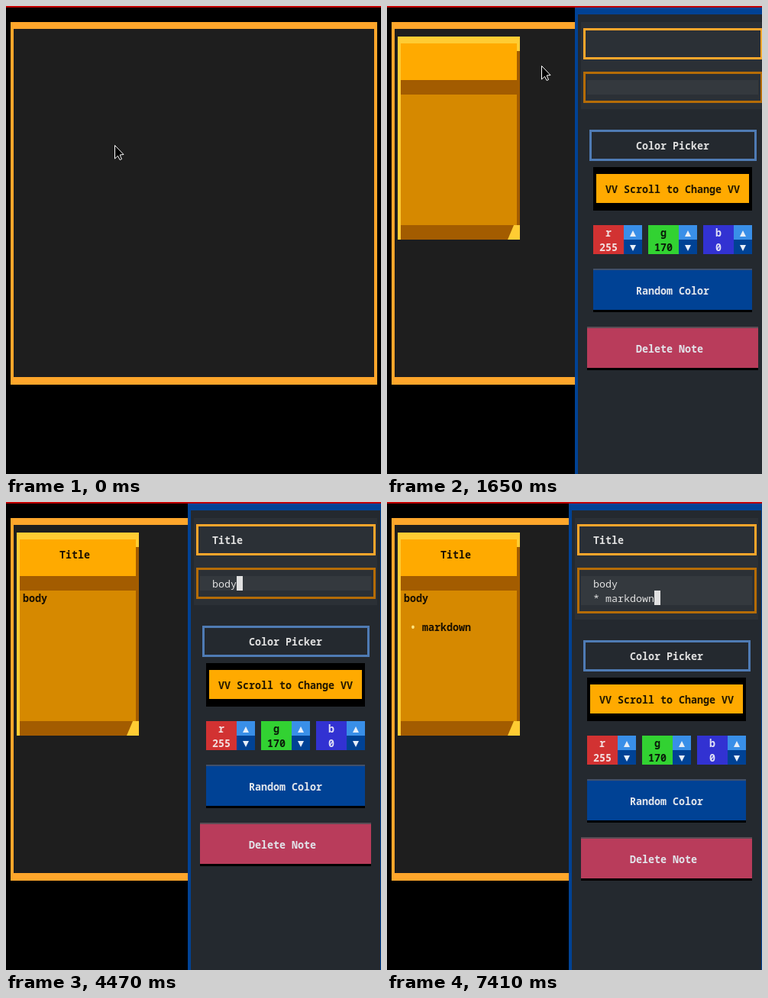
Write an HTML page with a canvas that moves like this. It is 491 by 613 pixels and loops after 8 s.

```html
<!DOCTYPE html>
<html lang="en">
<head>
<meta charset="utf-8">
<title>Sticky notes</title>
<style>
html, body { margin: 0; width: 100%; height: 100%; overflow: hidden; background: #000; }
canvas { display: block; }
</style>
</head>
<body>
<canvas id="stage" width="491" height="613"></canvas>
<script>
const ctx = document.getElementById('stage').getContext('2d');
const LOOP = 8000, CELL = 8, ROW = 19;
const FONT = '13.333px "Noto Sans Mono", "DejaVu Sans Mono", monospace';
const BLUE = '#004295', AMBER = '#ffaa00', BROWN = '#a35c00', YELLOW = '#ffcc33';
const LIGHT = '#e0e0e0', PANEL = '#24292f', SECTION = '#2b3036';

// Key presses as [time, characters typed so far]
const titleKeys = [[2520, 1], [2580, 2], [2820, 3], [2910, 4], [3000, 5]];
const bodyKeys = [[3990, 1], [4140, 2], [4380, 3], [4470, 4], [4710, 5], [5640, 6], [5760, 7],
  [5910, 8], [6000, 9], [6090, 10], [6300, 11], [7020, 12], [7140, 13], [7290, 14], [7410, 15]];
const caretOff = [[3870, 3990], [5160, 5580], [6840, 7020]];
const mousePath = [[630, 148, 283], [750, 95, 133], [870, 93, 106], [1050, 104, 128],
  [1500, 104, 128], [1650, 202, 78], [1800, 280, 66]];

function rect(x0, y0, x1, y1, color) {
  ctx.fillStyle = color;
  ctx.fillRect(x0, y0, x1 - x0, y1 - y0);
}

function frame(x0, y0, x1, y1, color) {
  ctx.strokeStyle = color;
  ctx.lineWidth = 3;
  ctx.strokeRect(x0 + 1.5, y0 + 1.5, x1 - x0 - 3, y1 - y0 - 3);
}

function poly(points, color) {
  ctx.beginPath();
  points.forEach(([x, y]) => ctx.lineTo(x, y));
  ctx.closePath();
  ctx.fillStyle = color;
  ctx.fill();
}

function text(str, x, rowTop, color, weight = 'bold') {
  ctx.font = weight + ' ' + FONT;
  ctx.fillStyle = color;
  ctx.fillText(str, x, rowTop + 15);
}

function typed(str, keys, t) {
  const last = keys.filter(k => k[0] <= t).pop();
  return last ? str.slice(0, last[1]) : '';
}

function easeInOut(p) {
  return p < 0.5 ? 4 * p ** 3 : 1 - (2 - 2 * p) ** 3 / 2;
}

function panelLeft(t) {
  const p = Math.min(1, Math.max(0, (t - 1250) / 500));
  return 494 - Math.round(easeInOut(p) * 32) * CELL;
}

function drawBoard() {
  rect(0, 0, 491, 613, '#000');
  rect(6, 21, 486, 496, '#ffa62b');
  rect(10, 30, 482, 486, '#1e1e1e');
}

function drawNote(title, body) {
  rect(14, 40, 174, 306, YELLOW);
  rect(18, 49, 170, 97, AMBER);
  rect(18, 97, 170, 116, BROWN);
  rect(170, 59, 174, 287, BROWN);
  rect(18, 116, 170, 287, '#d68900');
  poly([[18, 287], [166, 287], [158, 306], [18, 306]], BROWN);

  const ink = '#1a1000';
  text(title, 22 + Math.floor((18 - title.length) / 2) * CELL, 59, ink);
  const [first, item = ''] = body.split('\n');
  const isList = item.length > 2;
  text(isList ? first : first + ' ' + item, 22, 116, ink);
  if (isList) {
    text('•', 30, 154, '#ffe680');
    text(item.slice(2), 46, 154, ink);
  }
}

function arrow(cx, cy, dir) {
  poly([[cx - 4, cy + 4 * dir], [cx + 4, cy + 4 * dir], [cx, cy - 4 * dir]], '#e6eef8');
}

function drawChannel(x, y, name, value, color, ink) {
  rect(x, y, x + 40, y + 38, color);
  text(name, x + 16, y, ink);
  text(value, x + (value.length > 1 ? 8 : 16), y + ROW, ink);
  rect(x + 40, y, x + 64, y + ROW, '#398fe8');
  rect(x + 40, y + ROW, x + 64, y + 38, BLUE);
  arrow(x + 52, y + 11, 1);
  arrow(x + 52, y + 30, -1);
}

function drawButton(x0, y, x1, label, color, edge) {
  rect(x0, y, x1, y + 57, '#000');
  rect(x0, y, x1, y + 54, edge);
  rect(x0, y + 2, x1, y + 54, color);
  text(label, 80, y + ROW, '#e2e6ec');
}

function drawPanel(t, title, body) {
  const lines = body.split('\n');
  const grow = (lines.length - 1) * ROW;
  ctx.save();
  ctx.translate(panelLeft(t), 0);

  rect(0, 2, 256, 613, BLUE);
  rect(4, 11, 252, 613, PANEL);
  rect(8, 21, 248, 135 + grow, SECTION);

  frame(11, 29, 246, 70, '#ffa62b');
  text(title, 32, 40, LIGHT);
  frame(11, 86, 246, 127 + grow, '#b56c07');
  rect(16, 97, 240, 116 + grow, '#34393e');
  lines.forEach((line, i) => text(line, 32, 97 + i * ROW, LIGHT, 'normal'));

  if (t >= 2130 && t < 3420) {
    const x = 32 + title.length * CELL;
    rect(x, 40, x + CELL, 59, LIGHT);
  } else if (t >= 3420 && !caretOff.some(([a, b]) => t >= a && t < b)) {
    const x = 32 + lines[lines.length - 1].length * CELL;
    rect(x, 97 + grow, x + CELL, 116 + grow, LIGHT);
  }

  ctx.translate(0, grow);
  frame(19, 162, 238, 203, '#4f7bb4');
  text('Color Picker', 80, 173, LIGHT);
  rect(24, 211, 232, 268, '#000');
  rect(28, 220, 228, 258, AMBER);
  text('VV Scroll to Change VV', 40, 230, '#211600');
  drawChannel(24, 287, 'r', '255', '#d23232', '#f3dede');
  drawChannel(96, 287, 'g', '170', '#32d232', '#0a1c0a');
  drawChannel(168, 287, 'b', '0', '#3232d2', '#e0e0f6');
  drawButton(24, 344, 232, 'Random Color', BLUE, '#41506a');
  drawButton(16, 420, 240, 'Delete Note', '#b93c5b', '#5c4c55');
  ctx.restore();
}

function mouseAt(t) {
  if (t < 270) return [142, 182];
  if (t < 630 || t >= 2520) return null;
  if (t >= 2130) return [300, 31];
  if (t >= 1950) return [290, 58];
  const i = mousePath.findIndex(k => k[0] > t);
  if (i < 0) return mousePath[mousePath.length - 1].slice(1);
  const [t0, x0, y0] = mousePath[i - 1], [t1, x1, y1] = mousePath[i];
  const p = (t - t0) / (t1 - t0);
  return [Math.round(x0 + (x1 - x0) * p), Math.round(y0 + (y1 - y0) * p)];
}

function drawMouse(pos) {
  if (!pos) return;
  ctx.save();
  ctx.translate(pos[0] + 0.5, pos[1] + 0.5);
  poly([[0, 0], [0, 17.5], [4, 13.8], [6.6, 19], [9, 18], [6.6, 12.5], [11.5, 12]], '#000');
  ctx.strokeStyle = '#fff';
  ctx.lineWidth = 1;
  ctx.stroke();
  ctx.restore();
}

function draw(now) {
  const t = Math.floor((now % LOOP) / 30) * 30;
  const title = typed('Title', titleKeys, t);
  const body = typed('body\n* markdown', bodyKeys, t);
  drawBoard();
  if (t >= 270) drawNote(title, body);
  drawPanel(t, title, body);
  rect(0, 0, 491, 2, '#c00000');
  drawMouse(mouseAt(t));
}

const start = performance.now();
function tick() {
  draw(performance.now() - start);
  requestAnimationFrame(tick);
}
tick();
</script>
</body>
</html>
```
